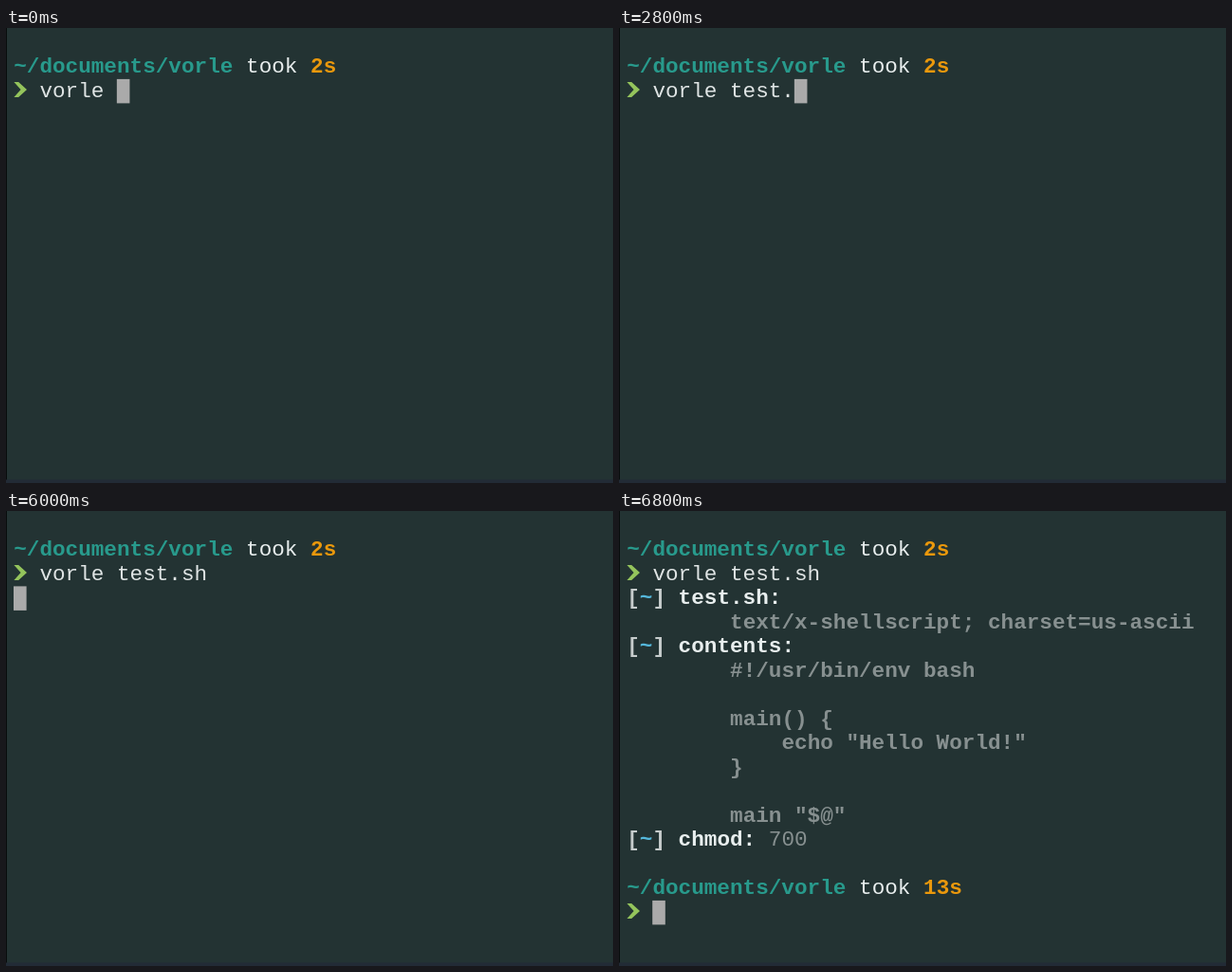
An HTML page that plays this animation: 640 px wide and 480 px high, repeating every 8 s.

```html
<!DOCTYPE html>
<html lang="en">
<head>
<meta charset="utf-8">
<style>
html, body { margin: 0; width: 640px; height: 480px; overflow: hidden; background: #233333; }
svg { display: block; }
text { font: 22.67px "Liberation Mono", monospace; white-space: pre; font-variant-ligatures: none; }
.bold { font-weight: bold; }
</style>
</head>
<body>
<svg id="stage" width="640" height="480" viewBox="0 0 640 480">
  <rect width="640" height="480" fill="#233333"/>
  <rect width="1" height="480" fill="#080c0c"/>
  <rect y="476.5" width="640" height="3.5" fill="#222b36"/>
  <g id="screen"></g>
  <rect id="cursor" width="13.6" height="25.5" fill="#aaaaaa"/>
</svg>
<script>
const LOOP = 8000, LEFT = 8.2, TOP = 28.4, CELL = 13.604, LINE = 25.5, ASCENT = 18.7;
const TEAL = "#289a8c", ORANGE = "#ea980c", GREEN = "#94c45c", WHITE = "#e8eeee",
      PLAIN = "#dfe4e4", GRAY = "#879090", BRACKET = "#c6cccc", CYAN = "#55b8dc";
const screen = document.getElementById("screen");
const cursor = document.getElementById("cursor");

const colX = col => LEFT + col * CELL;
const rowY = row => TOP + row * LINE;

function add(tag, attrs, parent) {
  const node = document.createElementNS("http://www.w3.org/2000/svg", tag);
  for (const key in attrs) node.setAttribute(key, attrs[key]);
  return parent.appendChild(node);
}

function write(group, row, col, string, fill, bold) {
  const node = add("text", { x: colX(col), y: rowY(row) + ASCENT, fill }, group);
  if (bold) node.classList.add("bold");
  node.textContent = string;
  return node;
}

function block(start) {
  const group = add("g", {}, screen);
  group.start = start;
  return group;
}

function prompt(group, row, took) {
  write(group, row, 0, "~/documents/vorle", TEAL, true);
  write(group, row, 18, "took", WHITE);
  write(group, row, 23, took, ORANGE, true);
  add("path", {
    d: "M8.4 3H13.2L22 11L13.2 19H8.4L15.6 11Z", fill: GREEN,
    transform: `translate(0 ${rowY(row + 1)})`
  }, group);
}

function heading(group, row, label) {
  write(group, row, 0, "[", BRACKET, true);
  write(group, row, 1, "~", CYAN, true);
  write(group, row, 2, "]", BRACKET, true);
  write(group, row, 4, label, WHITE, true);
}

const detail = (group, row, col, string) => write(group, row, col, string, GRAY, true);

const first = block(0);
prompt(first, 0, "2s");
const command = write(first, 1, 2, "", PLAIN);

const head = block(6200);
heading(head, 2, "test.sh:");
detail(head, 3, 8, "text/x-shellscript; charset=us-ascii");
heading(head, 4, "contents:");
detail(head, 5, 8, "#!/usr/bin/env bash");
detail(head, 7, 8, "main() {");

const tail = block(6400);
detail(tail, 8, 12, 'echo "Hello World!"');
detail(tail, 9, 8, "}");
detail(tail, 11, 8, 'main "$@"');
heading(tail, 12, "chmod:");
write(tail, 12, 11, "700", GRAY);

const last = block(6800);
prompt(last, 14, "13s");

const blocks = [first, head, tail, last];
const keyTimes = [400, 1000, 1600, 2000, 2800, 4600, 4800];
const jumps = [[6000, 2, 0], [6200, 8, 0], [6400, 13, 0], [6800, 15, 2]];

function render(time) {
  const typed = "vorle " + "test.sh".slice(0, keyTimes.filter(k => time >= k).length);
  command.textContent = typed;
  for (const group of blocks) {
    group.setAttribute("visibility", time >= group.start ? "visible" : "hidden");
  }
  let row = 1, col = 2 + typed.length;
  for (const [at, r, c] of jumps) if (time >= at) [row, col] = [r, c];
  cursor.setAttribute("x", colX(col) - 0.2);
  cursor.setAttribute("y", rowY(row));
}

const begin = performance.now();
function tick() {
  render((performance.now() - begin) % LOOP);
  requestAnimationFrame(tick);
}
render(0);
requestAnimationFrame(tick);
</script>
</body>
</html>
```
